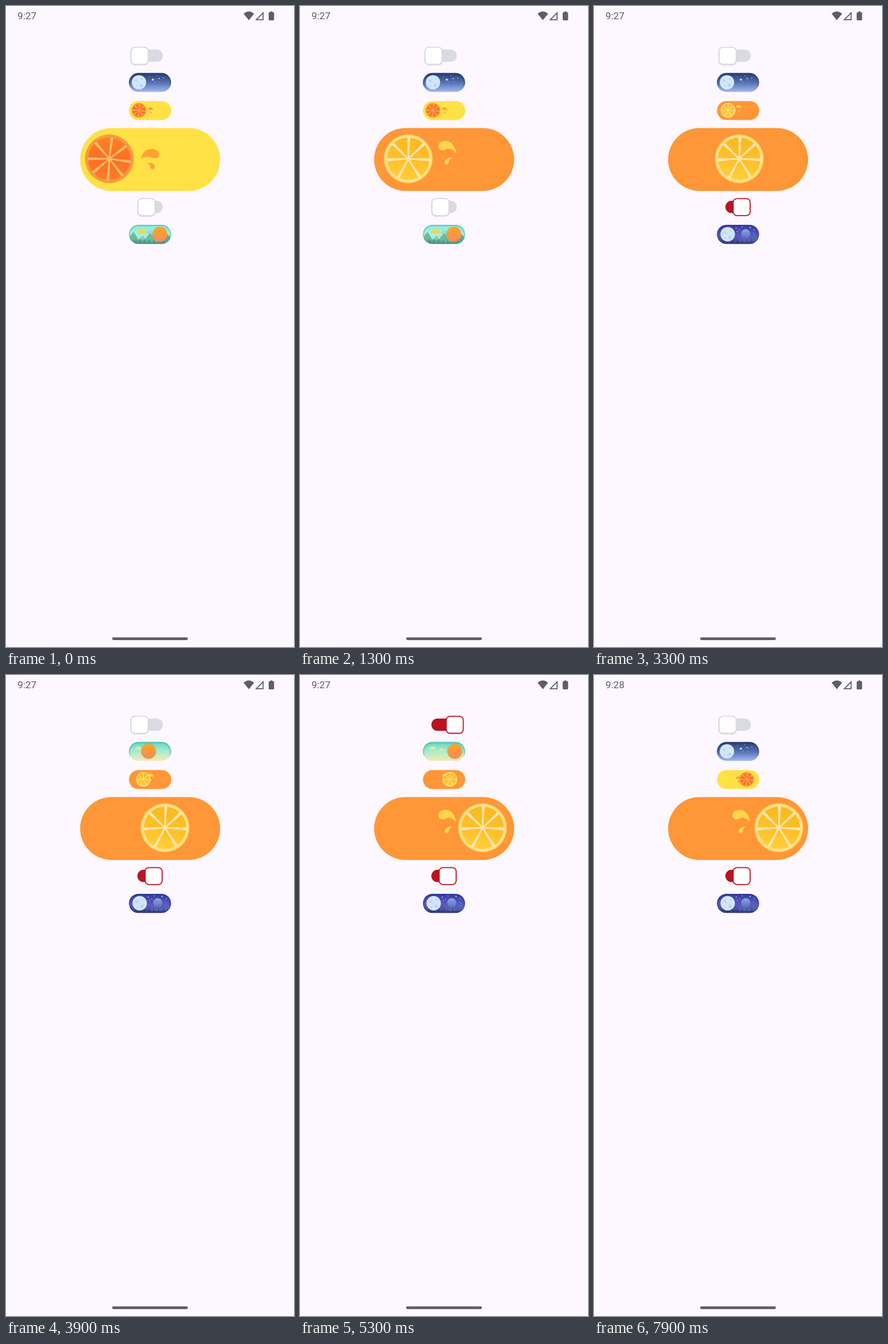
An HTML page that plays this animation: 502x1116 px, repeating every 8000 ms.

```html
<!DOCTYPE html>
<html lang="en">
<head>
<meta charset="utf-8">
<title>Switches</title>
<style>
html, body { margin: 0; width: 100%; height: 100%; overflow: hidden; background: #fdf7ff; }
svg { display: block; width: 100vw; height: 100vh; }
text { font: 17.2px Roboto, "Open Sans", sans-serif; fill: #5f5d66; }
</style>
</head>
<body>
<svg id="stage" viewBox="0 0 502 1116"></svg>
<script>
const LOOP = 8000, STEP = 100;
const INK = '#5f5d66', RED = '#ba1421', GREY = '#dadae3';
const stage = document.getElementById('stage');

// ---------- building blocks ----------
const circle = (x, y, r, fill, more = '') =>
  `<circle cx="${x}" cy="${y}" r="${r}" fill="${fill}" ${more}/>`;
const path = (d, fill, more = '') => `<path d="${d}" fill="${fill}" ${more}/>`;
const rect = (x, y, w, h, r, fill, more = '') =>
  `<rect x="${x}" y="${y}" width="${w}" height="${h}" rx="${r}" fill="${fill}" ${more}/>`;
const group = (id, body, more = '') => `<g id="${id}" ${more}>${body}</g>`;
const gradient = (id, colors, dir = 'x2="0" y2="1"') =>
  `<linearGradient id="${id}" x1="0" y1="0" ${dir}>` + colors.map((c, i) =>
    `<stop offset="${i / (colors.length - 1)}" stop-color="${c}"/>`).join('') + '</linearGradient>';

// ---------- citrus switch, drawn around its centre ----------
function slice(c) {
  const spokes = c.spokes.map(a =>
    `<path d="M0-1L37.5-2.6V2.6L0 1Z" transform="rotate(${a})"/>`).join('');
  return circle(0, 0, 42.6, c.skin) + circle(0, 0, 41, c.rind) +
    circle(0, 0, 37, c.pulp) + `<g fill="${c.pith}">${spokes}</g>` +
    circle(0, 0, 4.2, c.pith);
}
const LEMON = {
  track: '#ff9637', drop: '#ffd54b', skin: '#ffd250', rind: '#ffe192',
  pulp: 'url(#lemon)', pith: '#ffe5ae', spokes: [-88, -43, 3, 58, 118, 177, 224],
  drops: 'M-10-24C-9-31-2-33 5-32.5C14-31 20-21 21-11C17-16 11-20 5-18.5C-1-14-10-15-10-24Z' +
         'M15-3C7-4 1 0 1 5C1 10 7 10 8 5C8 1 11-2 15-3Z'
};
const BLOOD = {
  track: '#ffe146', drop: '#ffa133', skin: '#f3a33f', rind: '#f9993a',
  pulp: 'url(#blood)', pith: '#ffbd68', spokes: [-83, -37, 8, 52, 94, 140, 180, 229],
  drops: 'M-16-1C-14-11-8-18 2-18C11-19 16-13 16-8C16-2 9-1 4-3C-4-6-11-5-16-1Z' +
         'M-6 7C1 5 8 6 8 12C8 16 6 18 3 17C0 16 0 14 0 11C-1 8-3 8-6 7Z'
};
function citrus(id, y, scale) {
  const side = (key, c) => group(id + key,
    rect(-122, -54.8, 244, 109.6, 54.8, c.track) + path(c.drops, c.drop) +
    group(id + key + 'Knob', slice(c)));
  return `<g transform="translate(251.2 ${y}) scale(${scale})">` +
    side('Off', BLOOD) + side('On', LEMON) + '</g>';
}

// ---------- sky switches, drawn around their centre ----------
const pill = fill => rect(-36.8, -16.6, 73.6, 33.2, 16.6, fill);
// Soft inner shadow, open at the bottom.
const shade = color => rect(-36.8, -16.6, 73.6, 42, 17, 'none',
  `stroke="${color}" stroke-width="3" opacity=".6" filter="url(#soft)"`);
const moon = circle(0, 0, 13.4, '#4a65a5', 'opacity=".35"') + circle(0, 0, 12.6, '#d2e6fc') +
  `<g fill="#b7d2f1" opacity=".75">` + circle(-5, -3, 2.6, '') + circle(4, 5, 3, '') +
  circle(5, -6, 1.6, '') + circle(-4, 6, 1.5, '') + circle(0, 0, 1.2, '') + '</g>';
const sun = circle(0, 0, 13.4, '#cf9a55', 'opacity=".5"') + circle(0, 0, 12.6, 'url(#sun)') +
  path('M-12 2C-7-4-4 3 1 0S8-3 12-1A12.6 12.6 0 0 1-12 2Z', '#f59650', 'opacity=".6"');
const star = (x, y, r) =>
  path(`M${x} ${y - r}L${x + r * .3} ${y - r * .3}L${x + r} ${y}L${x + r * .3} ${y + r * .3}` +
    `L${x} ${y + r}L${x - r * .3} ${y + r * .3}L${x - r} ${y}L${x - r * .3} ${y - r * .3}Z`, '#dcebff');
const cloud = (x, y, s, fill) =>
  path('M-6 3A3 3 0 0 1-4-1A4 4 0 0 1 3-2A3 3 0 0 1 6 3Z', fill,
    `transform="translate(${x} ${y}) scale(${s})"`);
const peak = (x, y, w, fill) =>
  path(`M${x - w} 17L${x - w * .35} ${y + 5}L${x} ${y}L${x + w * .4} ${y + 6}L${x + w} 17Z`, fill);
function trees(fill) {
  let d = '';
  for (let i = 0; i < 25; i++) {
    const x = -36 + i * 3, h = 6 + 3 * Math.sin(i * 2.3) + Math.abs(x) * .05;
    d += `M${x - 1.3} 17L${x} ${(16 - h).toFixed(1)}L${x + 1.3} 17Z`;
  }
  return path(d, fill);
}

const plainNight = pill('url(#night)') + star(5, -5, 2.8) + star(16, -7, 1.7) + star(24, -8, 1.3) +
  star(-1, -10, 1) + star(12, -12, 1) + star(17, -1, .8) + star(9, -1, 1) + shade('#203465');
const plainDay = pill('url(#day)') + cloud(-20, -6, .9, '#d5eca3') + cloud(-4, -3, .8, '#d9eca6') +
  cloud(-13, 1, .6, '#c2edbb') + cloud(2, 5, .7, '#d8ecb4') + shade('#249a91');
const hillDay = pill('url(#day2)') + circle(-15, -5, 4.5, '#f5d94d') + cloud(-15, -5, 1.3, '#eed65a') +
  cloud(1, -4, 1.1, '#8edfe0') + cloud(7, 0, 1, '#7ed3da') +
  peak(-29, -4, 12, '#6dbb9a') + peak(-13, 2, 13, '#8acdaa') + peak(0, -2, 13, '#70ba9a') +
  peak(17, 3, 14, '#86c8a9') + peak(31, 0, 13, '#65aa98') +
  path('M-37 11Q-18 7 0 11T37 10V17H-37Z', '#68b096') + trees('#437f82') + shade('#289a92');
const hillNight = pill('url(#night2)') + star(-3, -11, 1.4) + star(7, -13, 1.2) + star(21, -12, 1.7) +
  star(28, -8, 1.2) + star(-1, -5, 1.2) + star(3, -8, 1) + star(27, -2, .9) +
  circle(13.5, -1, 8, 'url(#dim)') +
  peak(-29, 0, 12, '#4252a1') + peak(-3, 3, 11, '#4659a6') + peak(13, 5, 15, '#5269b3') +
  peak(29, -2, 12, '#5365b5') + path('M-37 12Q-18 8 0 12T37 11V17H-37Z', '#3f4a92') +
  trees('#303568') + shade('#2b348b');

const sky = (id, y, day, night) => {
  const side = (key, scene, knob) => group(id + key,
    `<g clip-path="url(#pill)">${scene}</g>` + group(id + key + 'Knob', knob));
  return `<g transform="translate(251 ${y})">` + side('On', day, sun) + side('Off', night, moon) + '</g>';
};

// ---------- square knob switches ----------
const square = (id, y) =>
  group(id + 'Track', rect(229, y - 10.8, 44.3, 21.6, 10.8, 'inherit')) +
  group(id + 'Knob',
    rect(-15.7, -15.2, 31.4, 31.4, 7.5, GREY, `id="${id}Shade"`) +
    rect(-14.8, -14.9, 29.6, 29.6, 6.6, '#fff', 'stroke-width="1.8"'));

const status = `<text id="clock" x="20" y="23.2"></text>` +
  path('M423.3 24.7L414.2 13.4Q423.3 5.8 432.4 13.4Z', INK) +
  path('M434.2 24.7L449 9.8V24.7ZM438.4 23H447.3V14Z', INK, 'fill-rule="evenodd"') +
  path('M460.6 9.5H464.6V11H466Q467.3 11 467.3 12.3V23.6Q467.3 24.9 466 24.9H459.2Q457.9 24.9 457.9 23.6V12.3Q457.9 11 459.2 11H460.6Z', INK);

stage.innerHTML = '<defs>' +
  gradient('lemon', ['#fdb91f', '#ffc22b', '#ffd43e'], 'x2="-.2" y2="1"') +
  gradient('blood', ['#ff7f27', '#ff6f25', '#ff7a2a']) +
  gradient('sun', ['#ffa51f', '#fc983a', '#f88b50']) +
  gradient('night', ['#273a70', '#5570b2', '#a3baf3']) +
  gradient('day', ['#67d6bf', '#a5edcf', '#f8eab2']) +
  gradient('day2', ['#8aead4', '#a8f4e2', '#97dcc0']) +
  gradient('night2', ['#343b9b', '#5a54bd', '#6d5dc8']) +
  gradient('dim', ['#87a7e4', '#5a6fbd']) +
  '<filter id="soft" x="-10%" y="-20%" width="120%" height="140%"><feGaussianBlur stdDeviation="1.1"/></filter>' +
  `<clipPath id="pill">${pill('#000')}</clipPath></defs>` +
  rect(0, 0, 502, 1116, 0, '#fdf7ff') + status +
  square('top', 86.5) + sky('plain', 133.2, plainDay, plainNight) +
  citrus('small', 182, .302) + citrus('big', 267.2, 1) +
  square('low', 349.8) + sky('hill', 397.6, hillDay, hillNight) +
  rect(185, 1099.3, 132, 4.6, 2.3, INK);

// ---------- motion ----------
const el = {};
stage.querySelectorAll('[id]').forEach(n => el[n.id] = n);
const mix = (a, b, p) => a + (b - a) * p;
const move = (id, x, y) => el[id].setAttribute('transform', `translate(${x} ${y})`);
const within = (t, from, to) => t >= from && t < to;

function ease(t, start, span) {
  const u = Math.min(1, Math.max(0, (t - start) / span));
  return .5 - .5 * Math.cos(Math.PI * u);
}

// Smooth curve through [time, value] points, flat at turns and ends.
function glide(t, pts) {
  const last = pts.length - 1;
  if (t <= pts[0][0]) return pts[0][1];
  if (t >= pts[last][0]) return pts[last][1];
  const slope = i => {
    if (i < 1 || i >= last) return 0;
    const [a, b, c] = [pts[i - 1], pts[i], pts[i + 1]];
    return (b[1] - a[1]) * (c[1] - b[1]) <= 0 ? 0 : (c[1] - a[1]) / (c[0] - a[0]);
  };
  const i = pts.findIndex(p => p[0] > t) - 1;
  const [t0, v0] = pts[i], [t1, v1] = pts[i + 1], h = t1 - t0, u = (t - t0) / h;
  const s = u * u * (3 - 2 * u);
  return mix(v0, v1, s) + h * u * (1 - u) * ((1 - u) * slope(i) - u * slope(i + 1));
}
const BIG = [[500, 0], [1300, .06], [2400, .26], [3300, .514], [4500, .838], [5300, .972], [5900, 1]];
const SMALL = [[2700, 0], [3300, .05], [4500, .385], [5300, .756], [6400, 1], [7100, 1], [7900, .88], [8700, .6]];

function setSides(id, on, x, y) {
  el[id + 'On'].style.display = on ? '' : 'none';
  el[id + 'Off'].style.display = on ? 'none' : '';
  move(id + (on ? 'On' : 'Off') + 'Knob', x, y);
}
function setSquare(id, on, x, y) {
  const color = on ? RED : GREY;
  el[id + 'Track'].setAttribute('fill', color);
  el[id + 'Knob'].setAttribute('stroke', color);
  el[id + 'Shade'].style.display = on ? 'none' : '';
  move(id + 'Knob', x, y);
}

function draw(t) {
  el.clock.textContent = t < 6600 ? '9:27' : '9:28';

  const top = ease(t, 4700, 400) - ease(t, 6000, 400);
  setSquare('top', within(t, 4700, 6000), mix(232.9, 269.7, top), 86.8);
  const low = ease(t, 2300, 400);
  setSquare('low', t >= 2300, mix(244.9, 257.4, low), 350.2);

  const plain = ease(t, 3600, 650) - ease(t, 6500, 650);
  setSides('plain', within(t, 3600, 6500), mix(-19.2, 18.8, plain), -.2);
  setSides('hill', t < 1880, mix(17.2, -18, ease(t, 1880, 650)), -.2);

  setSides('small', within(t, 2700, 7100), mix(-64.5, 64.5, glide(t, SMALL)), -1.2);
  setSides('big', t >= 500, mix(-71, 71, glide(t, BIG)), -1.2);
}

function tick() {
  draw(Math.floor(performance.now() % LOOP / STEP) * STEP);
  requestAnimationFrame(tick);
}
tick();
</script>
</body>
</html>
```
